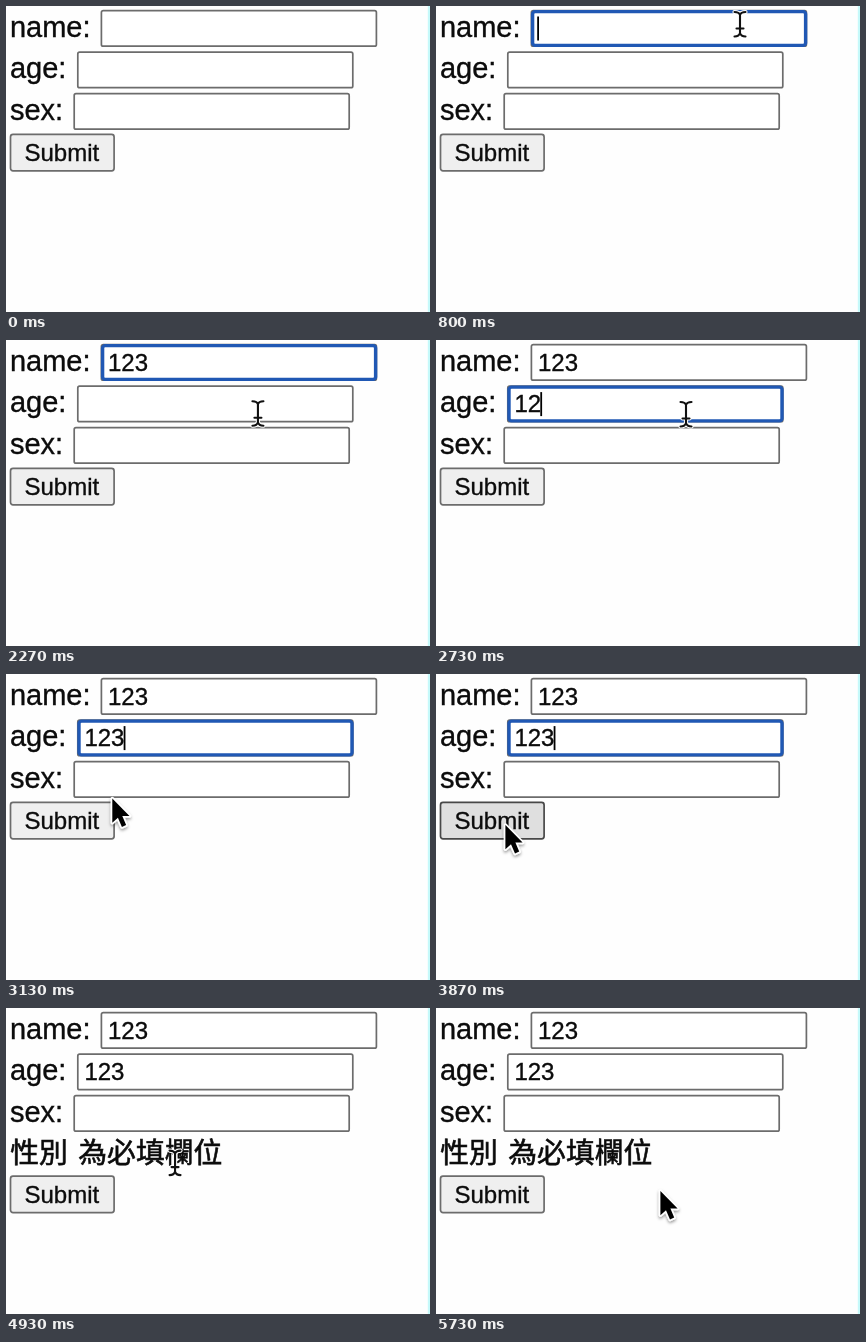
Recreate the animation shown at these times as an HTML page. Size 424 by 306 pixels, loop 7.19 s.

```html
<!DOCTYPE html>
<html lang="zh-Hant">
<head>
<meta charset="utf-8">
<title>Form validation</title>
<style>
  html, body { margin: 0; width: 100%; height: 100%; overflow: hidden; background: #fefefe; }
  svg { display: block; width: 424px; height: 306px; }
  text { font-family: "Liberation Sans", Arial, sans-serif; fill: #0c0c0c; stroke: #0c0c0c; stroke-width: .35; }
  .label { font-size: 29px; }
  .value { font-size: 24px; }
  .error { font: 28.8px "Noto Sans CJK TC", "Noto Sans CJK", sans-serif; stroke-width: .6; }
  .box { fill: #fff; stroke: #6c6c6c; stroke-width: 1.7; }
  .ring { fill: none; stroke: #2058b4; stroke-width: 3.4; }
  .caret { stroke: #000; stroke-width: 1.8; }
  #face { fill: #efefef; stroke: #6c6c6c; stroke-width: 1.7; }
  #face.hover { fill: #dfdfdf; stroke: #484848; }
</style>
</head>
<body>
<svg viewBox="0 0 424 306">
  <defs>
    <filter id="shade" x="-50%" y="-50%" width="200%" height="200%">
      <feDropShadow dx="0" dy="1.8" stdDeviation="1.5" flood-opacity=".4"/>
    </filter>
    <path id="bar" d="M-5.5 -12Q-1 -12 0 -9Q1 -12 5.5 -12M0 -9V9M-5.5 12.5Q-1 12.5 0 9Q1 12.5 5.5 12.5M-3.5 4.5H3.5"/>
  </defs>
  <rect width="424" height="306" fill="#fefefe"/>
  <rect x="421.8" width="2.2" height="306" fill="#c6f9fa"/>
  <g id="fields"></g>
  <g id="error">
    <text class="error" x="4.2" y="155">性別</text>
    <text class="error" x="72.3" y="155">為必填欄位</text>
  </g>
  <g id="button">
    <rect id="face" x="4.5" y="128.4" width="103.6" height="36.4" rx="2.5"/>
    <text class="value" x="18.5" y="155">Submit</text>
  </g>
  <g id="arrow" filter="url(#shade)">
    <path d="M.4 1V25.3L6 20.2L10 29.4L14.2 27.6L10.4 18.6H17.6Z" fill="#000"
      stroke="#fff" stroke-width="3.4" stroke-linejoin="round" paint-order="stroke"/>
  </g>
  <g id="beam" fill="none" stroke-linecap="round">
    <use href="#bar" stroke="#fff" stroke-width="4.2"/>
    <use href="#bar" stroke="#111" stroke-width="2.1"/>
  </g>
</svg>
<script>
const LOOP = 7190, TICK = 200 / 3, BLINK = 500, ERROR_AT = 4000;
const $ = id => document.getElementById(id);
const show = (el, on) => el.setAttribute("visibility", on ? "visible" : "hidden");

function add(tag, attrs, text = "") {
  const el = document.createElementNS("http://www.w3.org/2000/svg", tag);
  for (const key in attrs) el.setAttribute(key, attrs[key]);
  el.textContent = text;
  return $("fields").appendChild(el);
}

const fields = [
  { label: "name:", x: 94.6, focus: 800, blur: 2330, keys: [1400, 1600, 1730] },
  { label: "age:", x: 71, focus: 2330, blur: 3930, keys: [2670, 2730, 2870] },
  { label: "sex:", x: 67.4, focus: LOOP, blur: LOOP, keys: [] }
];

fields.forEach((f, i) => {
  f.y = 3.8 + 41.5 * i;
  add("text", { class: "label", x: 3.9, y: f.y + 27.1 }, f.label);
  add("rect", { class: "box", x: f.x + .8, y: f.y + .8, width: 275, height: 35.6, rx: 1.8 });
  f.ring = add("rect", { class: "ring", x: f.x + 2, y: f.y + 1.8, width: 273, height: 33.8, rx: 2.5 });
  f.value = add("text", { class: "value", x: f.x + 7.4, y: f.y + 26.9 });
  f.caret = add("path", { class: "caret" });
});

// pointer moves, each easing out to its end point
const origin = { x: 205, y: 111 };
const moves = [
  { from: 470, to: 600, x: 304, y: 18 },
  { from: 1470, to: 1600, x: 381, y: 25 },
  { from: 1600, to: 1730, x: 366, y: 30 },
  { from: 1870, to: 2330, x: 250, y: 74 },
  { from: 2870, to: 3130, x: 108, y: 122 },
  { from: 3130, to: 3400, x: 69, y: 150 },
  { from: 4730, to: 4930, x: 167, y: 154 },
  { from: 4930, to: 5400, x: 233, y: 174 },
  { from: 5470, to: 5730, x: 224, y: 182 }
];
const easeOut = u => 1 - (1 - u) ** 2;

function pointerAt(t) {
  let { x, y } = origin;
  for (const m of moves) {
    const e = easeOut(Math.min(1, Math.max(0, (t - m.from) / (m.to - m.from))));
    x += (m.x - x) * e;
    y += (m.y - y) * e;
  }
  return { x, y };
}

const inside = (p, x, y, w, h) => p.x >= x && p.x <= x + w && p.y >= y && p.y <= y + h;

function renderField(f, t) {
  const pressed = f.keys.filter(at => t >= at);
  const focused = t >= f.focus && t < f.blur;
  const last = pressed.length ? pressed[pressed.length - 1] : f.focus;
  f.value.textContent = "123".slice(0, pressed.length);
  f.caret.setAttribute("d", `M${f.x + 7.5 + pressed.length * 13.35} ${f.y + 6.8}v24`);
  show(f.ring, focused);
  show(f.caret, focused && Math.floor((t - last) / BLINK) % 2 === 0);
}

function render(t) {
  const failed = t >= ERROR_AT;
  fields.forEach(f => renderField(f, t));
  show($("error"), failed);
  $("button").setAttribute("transform", `translate(0 ${failed ? 39.8 : 0})`);

  // the pointer is sampled 15 times a second
  const p = pointerAt(Math.floor((t + 4) / TICK) * TICK + 4);
  const visible = t >= moves[0].from;
  const overText = fields.some(f => inside(p, f.x, f.y, 276, 34)) ||
    failed && inside(p, 4, 126, 212, 41);
  $("face").classList.toggle("hover", visible && !failed && inside(p, 4, 128, 104, 37));
  show($("arrow"), visible && !overText);
  show($("beam"), visible && overText);
  $(overText ? "beam" : "arrow").setAttribute("transform", `translate(${p.x} ${p.y})`);
}

const start = performance.now();
function loop() {
  render((performance.now() - start) % LOOP);
  requestAnimationFrame(loop);
}
loop();
</script>
</body>
</html>
```
